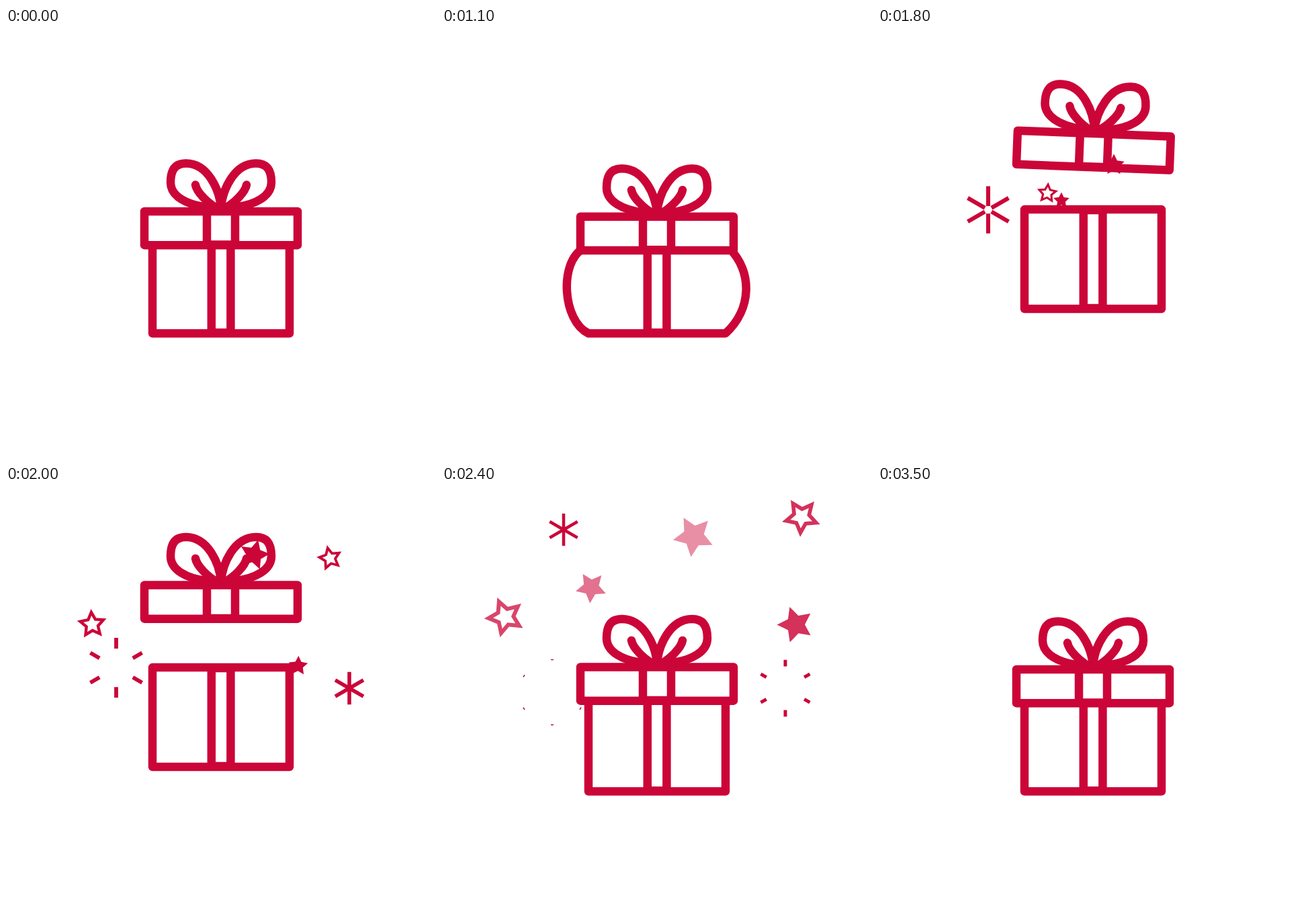
Recreate the animation shown at these times as an HTML page. Size 640x640 px, loop 3.6 s.

```html
<!DOCTYPE html>
<html lang="en">
<head>
<meta charset="utf-8">
<title>Gift box</title>
<style>
  html, body { margin: 0; width: 100%; height: 100%; overflow: hidden; background: #fff; }
  svg { display: block; width: 100vw; height: 100vh; }
  .line { fill: #fff; stroke: #cb0538; stroke-width: 12.5; stroke-linejoin: round; stroke-linecap: round; }
  .open { fill: none; }
  .solid { fill: #cb0538; }
  .hollow { fill: none; stroke: #cb0538; stroke-miterlimit: 10; }
  .flake { stroke: #cb0538; }
</style>
</head>
<body>
<svg viewBox="0 0 640 640">
  <g id="back"></g>
  <g id="box">
    <path id="sides" class="line"/>
    <rect class="line" x="305.8" y="307.5" width="28.6" height="146"/>
  </g>
  <g id="lid">
    <g id="loop" class="line open">
      <path d="M320 268C318 242 301 201.5 268 201.5C250 201.5 245 214 245 230C245 250 268 263 300 267L320 268"/>
      <path d="M282 233.5C284 245 302 262 314 268"/>
    </g>
    <use href="#loop" transform="matrix(-1 0 0 1 640 0)"/>
    <rect class="line" x="206" y="273" width="228" height="50.2"/>
    <rect class="line" x="299" y="273" width="42" height="49.5"/>
  </g>
  <g id="front"></g>
</svg>
<script>
const LOOP = 3600, STEP = 100, JUMP = 1600;
const $ = id => document.getElementById(id);
const clamp = v => Math.min(1, Math.max(0, v));
const easeOut = p => 1 - (1 - clamp(p)) ** 3;
const mix = (a, b, p) => a + (b - a) * p;
const wave = turns => Math.sin(2 * Math.PI * turns);

// Thrown upwards and falling back to rest.
function hop(t, start, dur, height) {
  const p = clamp((t - start) / dur);
  return -4 * height * p * (1 - p);
}

const flakes = [
  { x: 164, y: 307, size: 49.5, start: 1500, life: 1250, lifted: true },
  { x: 511, y: 301, size: 44.5, start: 1800, life: 1250 },
  { x: 181, y: 65, size: 36.5, start: 2200, life: 950 },
  { x: 447, y: 170.5, size: 27, start: 2400, life: 950 }
];
// turn is the angle at 2200 ms, spin is in degrees per ms
const stars = [
  { from: [367, 283], to: [94, 195], start: 1700, dur: 600, size: 33, turn: -13, spin: -0.045, fade: 2250, hollow: true },
  { from: [310, 334], to: [222, 151], start: 1700, dur: 600, size: 25, turn: 27, spin: 0.067, fade: 2150 },
  { from: [334, 298], to: [374.5, 74.5], start: 1700, dur: 600, size: 33, turn: 29, spin: 0.072, fade: 2085, front: true },
  { from: [412, 283], to: [534, 201], start: 1950, dur: 750, size: 34, turn: -8, spin: -0.052, fade: 2300 },
  { from: [330, 285], to: [535, 46], start: 1800, dur: 550, size: 33, turn: -22.5, spin: -0.049, fade: 2300, hollow: true }
];

function add(parent, cls) {
  const el = document.createElementNS('http://www.w3.org/2000/svg', 'path');
  el.setAttribute('class', cls);
  return parent.appendChild(el);
}
for (const f of flakes) f.el = add($('back'), 'flake');
for (const s of stars) s.el = add($(s.front ? 'front' : 'back'), s.hollow ? 'hollow' : 'solid');

function set(el, attrs) {
  for (const name in attrs) el.setAttribute(name, attrs[name]);
}

// Point at a distance from the centre, clockwise from the top.
function polar(r, turns) {
  const a = 2 * Math.PI * turns;
  return `${(r * Math.sin(a)).toFixed(2)} ${(-r * Math.cos(a)).toFixed(2)}`;
}

function starPath(r) {
  const pts = Array.from({ length: 10 }, (_, i) => polar(i % 2 ? r / 2 : r, i / 10));
  return `M${pts.join('L')}Z`;
}

function raysPath(inner, outer) {
  return Array.from({ length: 6 }, (_, i) => `M${polar(inner, i / 6)}L${polar(outer, i / 6)}`).join('');
}

// Box outline, b is how far the sides bulge.
function sidesPath(b) {
  return `M218 454.5C${218 - 39 * b} 436 ${218 - 44 * b} 348 ${218 - 8 * b} ${306.5 + 22 * b}` +
    `H${422 + 6 * b}C${422 + 40 * b} 362 ${422 + 40 * b} 418 422 454.5Z`;
}

function drawStar(s, t) {
  const age = t - s.start, alpha = clamp(1 - (t - s.fade) / 570);
  s.el.style.display = age > 0 && alpha > 0 ? '' : 'none';
  const p = easeOut(age / s.dur);
  const x = mix(s.from[0], s.to[0], p), y = mix(s.from[1], s.to[1], p);
  const r = s.size * (1 - 0.62 * (1 - clamp(age / 1000)) ** 2);
  set(s.el, {
    d: starPath(s.hollow ? r * 0.79 : r),
    'stroke-width': r * 0.19,
    opacity: alpha,
    transform: `translate(${x} ${y}) rotate(${s.turn + s.spin * (t - 2200)})`
  });
}

function drawFlake(f, t, lift) {
  const p = (t - f.start) / f.life;
  const on = p > 0 && p < 1;
  f.el.style.display = on ? '' : 'none';
  if (!on) return;
  const outer = 1 - (1 - p) ** 4.5, inner = easeOut((p - 0.21) / 0.76);
  set(f.el, {
    d: raysPath(f.size * inner, f.size * outer),
    'stroke-width': f.size * 0.125 * (1 - p ** 3),
    transform: `translate(${f.x} ${f.y + (f.lifted ? lift : 0)})`
  });
}

function draw(t) {
  // The box is pressed down, then let go.
  const release = clamp((JUMP + 100 - t) / 200);
  const bulge = release * 1.04 * Math.max(0, wave(t / 5200)) ** 1.45;
  const press = release * 7.8 * Math.max(0, wave(t / 3900)) ** 0.6;

  const lift = hop(t, JUMP, 600, 41);
  const y = press + hop(t, JUMP, 636, 134.5) + hop(t, JUMP + 636, 664, 4.8);
  const air = Math.min(800, Math.max(0, t - JUMP));
  const angle = (1.25 + 0.00475 * air) * wave(air / 800);

  set($('lid'), { transform: `translate(${angle * 0.4} ${y}) rotate(${angle} 320 298)` });
  set($('box'), { transform: `translate(0 ${lift})` });
  set($('sides'), { d: sidesPath(bulge) });
  flakes.forEach(f => drawFlake(f, t, lift));
  stars.forEach(s => drawStar(s, t));
}

const begin = performance.now();
function tick() {
  const t = (performance.now() - begin) % LOOP;
  draw(Math.floor(t / STEP) * STEP);
  requestAnimationFrame(tick);
}
tick();
</script>
</body>
</html>
```
